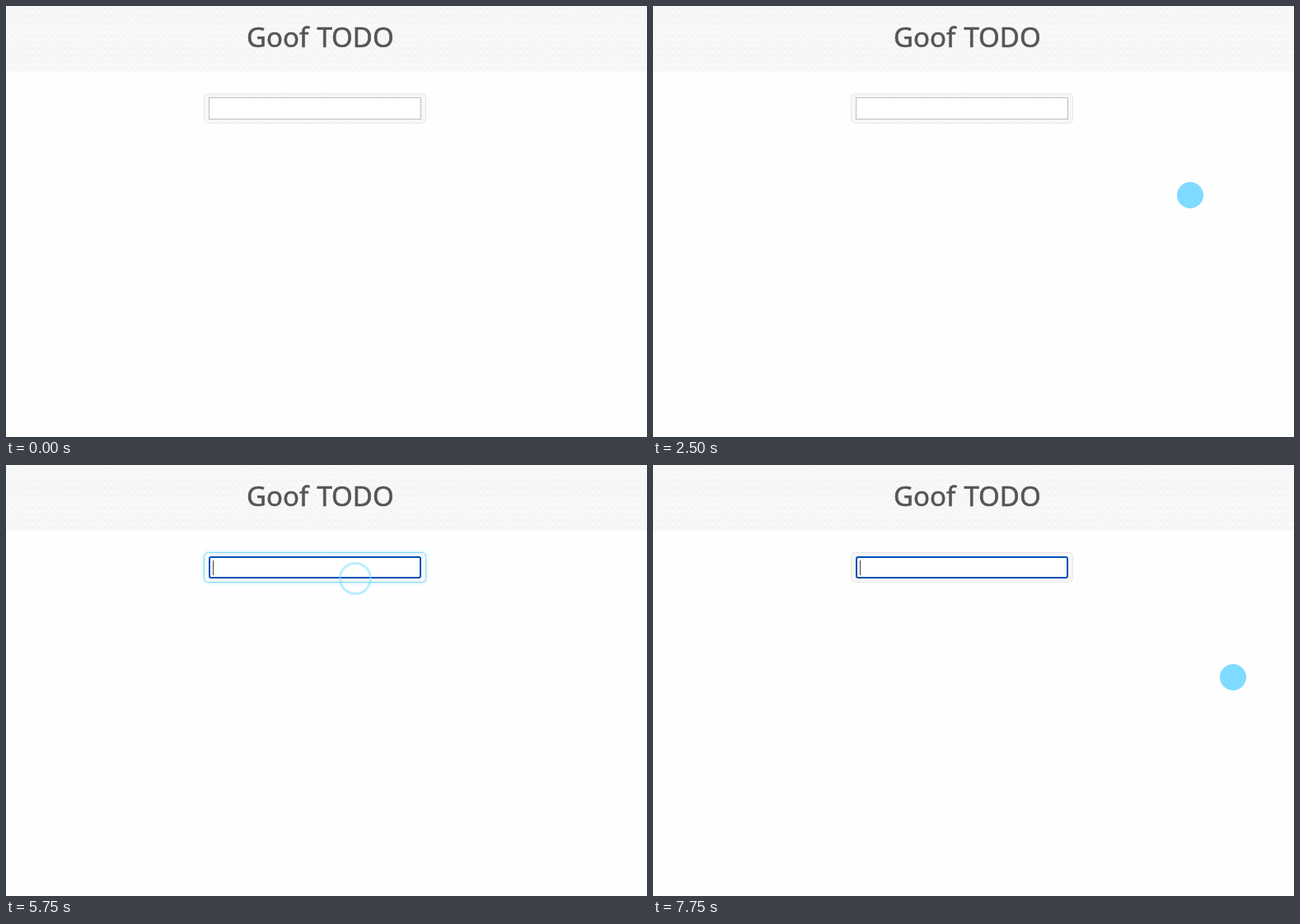
These frames come from a looping animation (778x524 px, 8000 ms). An HTML page:

```html
<!DOCTYPE html>
<html lang="en">
<head>
<meta charset="utf-8">
<title>Goof TODO</title>
<style>
  html, body { margin: 0; width: 100%; height: 100%; overflow: hidden; background: #fefefe; }
  svg { display: block; width: 778px; height: 524px; }
  text { font: 500 33px "Noto Sans", "Open Sans", sans-serif; word-spacing: 1.5px; }
  .title { fill: #555; stroke: #555; stroke-width: .6px; }
</style>
</head>
<body>
<svg viewBox="0 0 778 524">
  <defs>
    <pattern id="weave" width="8" height="8" patternUnits="userSpaceOnUse">
      <rect width="8" height="8" fill="#f9f9f9"/>
      <path d="M0 4L4 0M2 6L6 2M4 8L8 4M0 4L2 6M6 2L8 4" stroke="#f1f1f1" fill="none"/>
    </pattern>
    <filter id="blur" x="-10%" y="-40%" width="120%" height="180%">
      <feGaussianBlur stdDeviation="2"/>
    </filter>
  </defs>
  <rect width="778" height="524" fill="#fefefe"/>
  <rect width="778" height="80" fill="url(#weave)"/>
  <text x="292" y="51" fill="#fff">Goof TODO</text>
  <text x="292" y="50" class="title">Goof TODO</text>

  <rect id="glow" x="240" y="106" width="270" height="37" rx="5" fill="#7fdbff" opacity=".65" filter="url(#blur)"/>
  <rect id="frame" x="240.5" y="106.5" width="269" height="36" rx="5"/>
  <rect id="field" fill="#fff"/>
  <rect id="caret" x="251" y="116" width="1" height="18" fill="#444"/>
  <circle id="disc" r="16" fill="#7fdbff"/>
  <circle id="ring" fill="none" stroke="#7fdbff" stroke-width="3"/>
</svg>
<script>
const LOOP = 8000, STEP = 250, FOCUS = 5750, LEAVE = 6750;
const TAPS = [1250, FOCUS], TAP_TIME = 3 * STEP;

// The pointer jumps from stop to stop
const stops = [
  { at: 500, x: 447, y: 98 },
  { at: 750, x: 350, y: 120 },
  { at: 1500, x: 462, y: 159 },
  { at: 2500, x: 652, y: 230 },
  { at: 5250, x: 503, y: 169 },
  { at: 5500, x: 423, y: 141 },
  { at: FOCUS, x: 424, y: 122 },
  { at: LEAVE, x: 617, y: 195 },
  { at: 7000, x: 704, y: 258 }
];

const el = id => document.getElementById(id);
const set = (id, attrs) => {
  for (const k in attrs) el(id).setAttribute(k, attrs[k]);
};
const show = (id, on) => set(id, { visibility: on ? "visible" : "hidden" });

function drawPointer(t) {
  const p = stops.findLast(s => s.at <= t);
  const tap = TAPS.find(at => t >= at && t < at + TAP_TIME);
  show("disc", p && !tap);
  show("ring", tap);
  if (!p) return;
  set("disc", { cx: p.x, cy: p.y });
  if (tap) {
    // A tap ring grows with ease-out while it fades
    const age = Math.floor((t - tap) / STEP);
    set("ring", {
      cx: p.x, cy: p.y + 16,
      r: 21 - 2.5 * (1 - age / 2) ** 2,
      opacity: 0.5 * 0.58 ** age
    });
  }
}

function drawField(t) {
  const focused = t >= FOCUS, hover = focused && t < LEAVE;
  show("glow", hover);
  set("frame", {
    fill: focused && !hover ? "#f7f7f7" : "url(#weave)",
    stroke: hover ? "#80dcfa" : "#e7e7e7"
  });
  const w = focused ? 2 : 1;
  set("field", {
    x: 246 + w / 2, y: 111 + w / 2, width: 258 - w, height: 27 - w,
    rx: focused ? 2 : 0, stroke: focused ? "#0052b8" : "#bfbfbf", "stroke-width": w
  });
  show("caret", focused && (t - FOCUS) % 1000 < 500);
}

const start = performance.now();
function tick() {
  const t = (performance.now() - start) % LOOP;
  drawPointer(t);
  drawField(t);
  requestAnimationFrame(tick);
}
tick();
</script>
</body>
</html>
```
